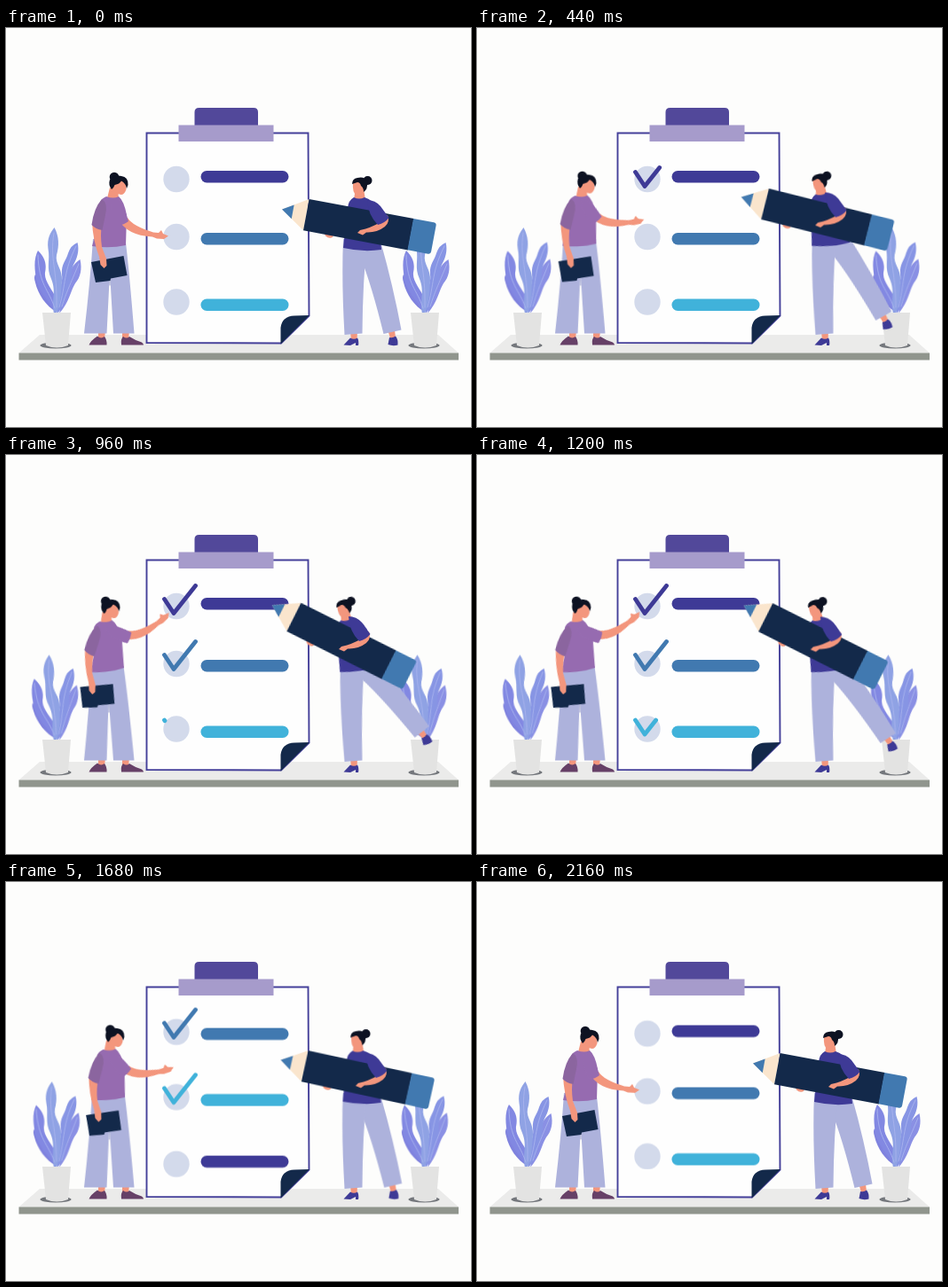
Write an HTML page without scripts that moves like this. It is 524 px wide and 450 px high and loops after 2.2 s.

```html
<!DOCTYPE html>
<html lang="en">
<head>
<meta charset="utf-8">
<title>Checklist</title>
<style>
html, body { margin: 0; width: 100%; height: 100%; overflow: hidden; background: #fdfdfc; }
svg { display: block; width: 524px; height: 450px; }

.skin { fill: #f3967d; }
.hair { fill: #0d1222; }
.pants { fill: #adb2dc; }
.ink { fill: #13294a; }
.navy { fill: #3e3a96; }
.blue { fill: #4179b0; }
.teal { fill: #40b2da; }
.dot { fill: #d3daeb; }
.line { fill: none; stroke-linecap: round; stroke-linejoin: round; }

/* --to holds the far pose of each moving part */
.lean, .step, .kick, .tilt { animation: lean 2.2s ease-in-out infinite; }
.step { animation-name: step; }
.kick { animation-name: kick; }
.tilt { animation-name: tilt; }
@keyframes lean { 0%, 100% { transform: none; } 50% { transform: var(--to); } }
@keyframes step { 0%, 84%, 100% { transform: none; } 32%, 50% { transform: var(--to); } }
@keyframes kick { 0%, 80%, 100% { transform: none; } 34%, 43.6% { transform: var(--to); } }
@keyframes tilt { 0%, 6%, 84%, 100% { transform: none; } 50% { transform: var(--to); } }

.leaves { --to: rotate(-3.6deg); transform-origin: 57px 322px; }
.hips { --to: skewX(1.1deg); transform-origin: 116px 346px; }
.torso { --to: translate(-2px, -3px) rotate(-6deg); transform-origin: 116px 245px; }
.point { --to: rotate(-43.5deg); transform-origin: 127px 200px; }
.carry { --to: rotate(12deg); transform-origin: 103px 202px; }
.stand { --to: skewX(1.8deg); transform-origin: 390px 346px; }
.body { --to: translate(-4px, -7px) rotate(-11deg); transform-origin: 400px 248px; }
.leg { --to: translate(-5px, -8px) rotate(-25.5deg); transform-origin: 405px 247px; }
.hold { --to: translate(-21px, -12px); }
.pencil { --to: rotate(16.7deg); transform-origin: 398px 228px; }

.scroll { animation: scroll 2.2s infinite; }
@keyframes scroll {
  0%, 67.5% { transform: none; animation-timing-function: cubic-bezier(.33, 0, .3, 1); }
  100% { transform: translateY(-214px); }
}

.check { stroke-width: 4.8; stroke-dasharray: 1 3; animation: 2.2s linear infinite; }
.c1 { stroke: #3e3a96; animation-name: tick1; }
.c2 { stroke: #4179b0; animation-name: tick2; }
.c3 { stroke: #40b2da; animation-name: tick3; }
@keyframes tick1 { 0%, 5.5% { stroke-dashoffset: 1.1; } 23.6%, 100% { stroke-dashoffset: 0; } }
@keyframes tick2 { 0%, 23.6% { stroke-dashoffset: 1.1; } 41.8%, 100% { stroke-dashoffset: 0; } }
@keyframes tick3 { 0%, 41.8% { stroke-dashoffset: 1.1; } 60%, 100% { stroke-dashoffset: 0; } }
</style>
</head>
<body>
<svg viewBox="0 0 524 450" xmlns="http://www.w3.org/2000/svg">
  <defs>
    <clipPath id="page"><path d="M159 119H340V324L310 354H159Z"/></clipPath>
    <path id="tick" pathLength="1" d="M178.500 162.500L189 178.500L213.500 147.500"/>
    <g id="rows">
      <g class="dot">
        <circle cx="192" cy="170.500" r="14.700"/>
        <circle cx="192" cy="235.500" r="14.700"/>
        <circle cx="192" cy="309" r="14.700"/>
      </g>
      <rect class="navy" x="219.500" y="161" width="99" height="13.500" rx="6.700"/>
      <rect class="blue" x="219.500" y="231" width="99" height="13.500" rx="6.700"/>
      <rect class="teal" x="219.500" y="305.500" width="99" height="13.500" rx="6.700"/>
    </g>
    <g id="leaves">
      <path fill="#7f82de" d="M57 320C45 314 36 300 33 287Q31 281 33 278Q42 286 47 297Z"/>
      <path fill="#8288e2" d="M57 322C45 304 34 294 33 276Q31 260 36 251C44 259 46 266 44 276C43 286 52 294 57 306Z"/>
      <path fill="#8a90e4" d="M60 322C64 304 66 294 70 284C72 270 78 265 83.500 261C86 272 84 281 78 288C72 298 72 308 60 322Z"/>
      <path fill="#8795e4" d="M58 322C54 300 65 292 63 278C62 266 68 262 70 254Q73 245 80.500 242C83 251 80 260 76 267C72 276 76 282 71 291C67 301 68 310 58 322Z"/>
      <path fill="#8fa2e4" d="M54 322C51 306 57 298 51 283C45 270 50 262 47.500 249C46 237 50 231 54.500 225C60 235 60 246 57 256C55 266 64 272 63 285C62 300 62 308 57 322Z"/>
      <path class="line" stroke="#a9b4ee" stroke-width=".9" d="M36 256C37 290 48 294 55 316M54 231C49 262 58 270 57 315M79 246C64 276 68 288 60 315M82 266C72 290 68 298 63 314"/>
    </g>
    <g id="pot">
      <ellipse cx="56" cy="358" rx="17.500" ry="3.500" fill="#74777c"/>
      <path fill="#e3e3e2" d="M41 321H73L70 358Q57 363 45 358Z"/>
    </g>
  </defs>

  <path fill="#ebebea" d="M38 346H487L510 366.500H14.500Z"/>
  <path fill="#90958d" d="M14.500 366.500H510V374.500H14.500Z"/>

  <!-- checklist -->
  <path fill="#fefefe" stroke="#45409a" stroke-width="1.900" d="M158.500 118.500H340.500L341.500 324.500L310 355.500L158.500 355Z"/>
  <g clip-path="url(#page)">
    <g class="scroll">
      <use href="#rows"/>
      <use href="#rows" y="214"/>
      <use href="#tick" class="line check c1"/>
      <use href="#tick" class="line check c2" y="63"/>
      <use href="#tick" class="line check c3" y="136.500"/>
    </g>
  </g>
  <path class="ink" d="M309.500 356.500V338Q311 325 325 324.500L342 324Z"/>
  <path fill="#52489a" d="M212.500 110V95Q212.500 90 217.500 90H279Q284 90 284 95V110Z"/>
  <path fill="#a69bcb" d="M194.500 109.500H301.500V128H194.500Z"/>

  <!-- plants -->
  <use href="#leaves" class="lean leaves"/>
  <use href="#pot"/>
  <g transform="translate(415)">
    <use href="#leaves" class="lean leaves"/>
    <use href="#pot"/>
  </g>

  <!-- woman with folder -->
  <path class="skin" d="M104 342H112L111 350L104 351ZM131 342H139L138 350L131 350Z"/>
  <path fill="#664067" d="M93.500 357.500Q95 353 103 347.500Q107 351 111 348Q114 352 113.500 357.500ZM130 357.500Q129 351 132 348Q136 351 139 348Q145 352 153 354.500Q155 356 155 357.500Z"/>
  <path class="pants lean hips" d="M98 238H134.500Q139 275 144.500 344.500H121L117 275L113.500 344.500H88Q95 285 98 238Z"/>
  <path class="line lean hips" stroke="#989dcc" stroke-width="1" d="M117 260V290"/>
  <g class="lean torso">
    <path class="skin" d="M117 180H126L127 193Q121 197 114 192Z"/>
    <path fill="#966bb0" d="M113 190Q121 193 127 190Q133 195 136 211L135 245Q117 249 97 246L104 222L106 196Q108 192 113 190Z"/>
    <path class="skin" d="M119.500 178Q122 171 131 171.500Q136 174 135.500 182Q133.500 188 129.500 188Q122 187 119.500 178Z"/>
    <circle class="hair" cx="122" cy="168" r="5.300"/>
    <path class="hair" d="M119 182Q115 177 117 171Q123 165 130 167Q138 168 137.500 177L136 181Q135 175 130 172.500Q128 176 122.500 177Q121 181 119 182Z"/>
    <g class="lean carry">
      <path class="ink" d="M96 264L132.500 257L136.500 279L118 282.500L117.500 285L101 287Z"/>
      <path class="skin" d="M97 219L108 222Q106 233 108 247L113 260L113.500 268L110.500 271L106.500 267L105 258Q98 240 97 219Z"/>
      <path fill="#8b659f" d="M108 193Q115 197 112 211L108.500 228Q101 227 96.500 222Q99 203 108 193Z"/>
    </g>
    <g class="lean point">
      <path class="skin" d="M126 215L137 214Q142 223 166 230.500L172 231L175 228L177 232L183 234.500L178 238L170 237.500L165 235.500Q136 234 126 215Z"/>
      <path fill="#966bb0" d="M121 194Q131 191 138 218Q133 222 126 223Q117 207 121 194Z"/>
    </g>
  </g>

  <!-- woman with pencil -->
  <path class="skin" d="M388 342H396L395.500 351L389 352Z"/>
  <path class="navy" d="M380.500 357.500L388 349.500Q392 352 396 349.500Q398 353 397 358H394V355L388 358Z"/>
  <g class="kick leg">
    <path class="skin" d="M430 340H438L439 350L433 350Z"/>
    <path class="navy" d="M430.500 357L432 349Q436 350 439 347.500Q442 351 441.500 357.500Q436 359 430.500 357Z"/>
    <path class="pants" d="M390 238L423 244Q436 290 445.500 340.500L425.500 345Q412 290 400 260Z"/>
  </g>
  <path class="pants step stand" d="M380 238H407Q402 285 401.500 344.500L381.500 346Q378 285 380 238Z"/>
  <g class="step body">
    <path class="skin" d="M394 181H403L405 194Q398 198 392 193Z"/>
    <path class="navy" d="M392 191Q398 194 404 191Q415 194 419 207L423 250Q402 253 380 248L385 203Q386 194 392 191Z"/>
    <path class="skin" d="M391 174Q398 169 404 175L403 184Q399 190 395 188.500Q390 186 391 174Z"/>
    <circle class="hair" cx="407.500" cy="172" r="5"/>
    <path class="hair" d="M390 176Q390 170 396 169Q404 167 407 173Q408 182 403 185Q403 180 400 178Q399 174 396 174Z"/>
  </g>
  <g class="step hold">
    <g class="tilt pencil">
      <path class="skin" d="M358 229L370 231L368 236Q364 238 360 234.500Z"/>
      <g transform="translate(311 204.500) rotate(10.600)">
        <path fill="#fae5cd" d="M0 0L28-17V19Z"/>
        <path class="blue" d="M0 0L12.500-7.300V8.500Z"/>
        <path class="ink" d="M28-17H148V19H28Z"/>
        <path class="blue" d="M147.500-17H171Q174-17 174-14V16Q174 19 171 19H147.500Z"/>
      </g>
    </g>
    <path class="skin" d="M419 217L430 211Q433 219 427 224Q418 231 406 230.500L402 233.500L396 231L399 228Q412 225 420 220Z"/>
    <path class="navy" d="M407 194Q416 194 422 201L431.500 214Q427 220 419 222Q408 211 407 194Z"/>
  </g>
</svg>
</body>
</html>
```
